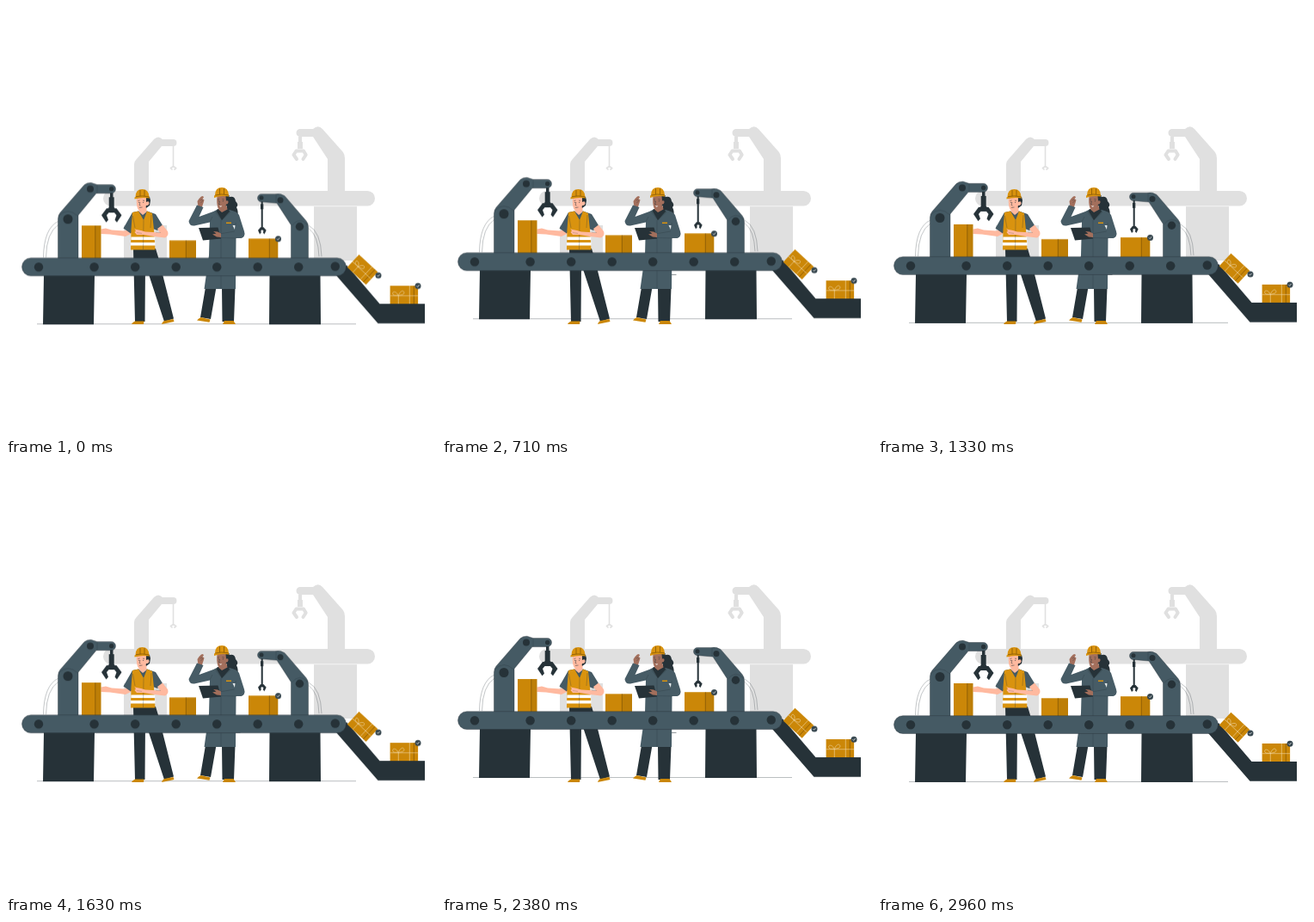
Recreate the animation shown at these times as an HTML page. Size 500x500 px, loop 3000 ms.

```html
<!DOCTYPE html>
<html lang="en">
<head>
<meta charset="utf-8">
<title>Conveyor line</title>
<style>
  html, body { margin: 0; width: 100%; height: 100%; overflow: hidden; background: #fff; }
  svg { display: block; width: 100vw; height: 100vh; }
  .float { animation: float 1.5s linear infinite; }
  @keyframes float {
    0%, 100% { transform: translateY(.3px); }
    50% { transform: translateY(-6.1px); }
  }
  .dark { fill: #263238; }
  .slate { fill: #455a64; }
  .coat { fill: #475c66; }
  .gold { fill: #cb8708; }
  .helmet { fill: #d9930f; }
  .pale { fill: #e0e0e0; }
  .skin { fill: #ffb99f; }
  .brown { fill: #a36f5c; }
  .edge { stroke: #263238; stroke-width: .4; }
  .line { fill: none; stroke: #263238; stroke-width: .5; }
  .seam { fill: none; stroke: #7d5207; stroke-width: .7; }
  .ribbon { fill: none; stroke: #f2d9a8; stroke-width: .6; }
  .round { fill: none; stroke-linecap: round; stroke-linejoin: round; }
</style>
</head>
<body>
<svg viewBox="0 0 500 500">
  <defs>
    <g id="check">
      <circle r="3.5" fill="#37474f"/>
      <path d="M-1.5 0L-.4 1.2L1.7-1.2" fill="none" stroke="#fff" stroke-width=".7"/>
    </g>
    <g id="gift">
      <rect class="gold" x="-16.2" y="-10.5" width="32.5" height="21"/>
      <path class="seam" d="M11.5-10.5V10.5"/>
      <path class="ribbon" d="M-16.2 1.2H16.2M6.5-10.5V10.5M-6.5 1.2V10.5M-6.5 1.2C-9-5-14-4-13-1S-8 0-6.5 1.2C-5-4-1-6 0-3S-4 0-6.5 1.2"/>
    </g>
  </defs>

  <!-- Background line -->
  <g class="pale">
    <path d="M137 255H187V296H137ZM358 233H408V296H358Z"/>
    <rect x="113" y="215" width="316" height="17.5" rx="8.7"/>
    <path d="M149 216V184Q149 181 151 179L172 155Q177 150 182 155H194.500A4 4 0 0 1 194.500 163H181L166 181V216Z"/>
    <path d="M374 216V178L357 152H342A4.500 4.500 0 0 1 342 143H357Q363 137.500 368 143L392 170Q394 173 394 177V216Z"/>
    <path d="M193.700 163H195.300V186H193.700ZM340 152H344V158H345V166H339V158H340Z"/>
    <g class="round" stroke="#e0e0e0">
      <path d="M193 190L191.500 188.500L194.500 186.500L197.700 188.500L196 190" stroke-width="1.700"/>
      <path d="M338 178L334.500 173L337.500 168.500H346L348.700 173L345.500 178" stroke-width="4"/>
    </g>
  </g>
  <path d="M358 233H408" fill="none" stroke="#eee" stroke-width=".7"/>

  <path class="line float" d="M36 369.600H407" opacity=".7"/>
  <path class="line" d="M264 312.500H272.500"/>

  <!-- Worker in vest -->
  <g>
    <path class="dark" d="M148 282H174L177 292L195 363.500L184 367L162 300L161.500 367H150Z"/>
    <path class="gold" d="M150 366.500H160.500L160 369.900H146Q147 368 150 366.500ZM184 366L194.500 364L195.500 367L181 369.900Q181.500 367.500 184 366Z"/>
    <path class="skin" d="M145 258L138 261.500L123 260.500L116 258.500L110.500 259.500V265L121 265.500L139 268L147 264Z"/>
    <path class="slate" d="M154 238.500L147 240L136.500 258.500L145 264.500L149 259H171L176 261L182 255L174 242L164 238.500Z"/>
    <path class="skin" d="M155 233H163.500V239.500L159 243L154.500 239Z"/>
    <path class="helmet" d="M154 238.500L147 240L145.500 260L145 283.500H173.500L172 260L170 241L164 238.500L160 249Z"/>
    <path d="M145.400 268.500H173.200V272H145.400ZM145 275H173.500V278.500H145Z" fill="#fff"/>
    <path class="line" d="M160 249L159.500 283M147.500 244L150 258M169 243L168 258" opacity=".55"/>
    <path class="skin" d="M176 259L182 254.500L188 262Q190 267 185 269.500L172 268L160 266L152 266L149.500 263L151 261.500L149.500 259.500L157 261L162 262.500L179 263.500Z"/>
    <path class="line" d="M152 263.500L158 264.500M174 263L180 263.500" opacity=".4"/>
    <path class="dark" d="M160 222H167L168 226L167 232L163 235L161 228Z"/>
    <path class="skin" d="M152 222H163V228Q166.500 226 166.500 229.500Q166 232.500 163 232L161.500 235.500Q158 239.500 153.500 236.500Q151.500 232 151.700 226Z"/>
    <path class="line" d="M153.500 226.500L155.500 226M159 226L161 226.500M156 228L155 231.500L156.500 232M155 234.500L158.500 234"/>
    <circle class="dark" cx="154.700" cy="228.300" r=".5"/>
    <circle class="dark" cx="159.700" cy="228.300" r=".5"/>
    <path class="helmet" d="M150.500 222Q150.500 213 158.500 213Q166 213 166.500 222L167 223.500Q158 222 149.500 224.500V222.500Z"/>
    <path class="seam" d="M151 221.700Q158 220 166.500 221.800M156 221V214M161 221V214"/>
  </g>

  <!-- Worker in coat -->
  <g>
    <path class="dark" d="M232 327H244.500L238 364L226 362ZM251 327H266.500L265 367H251.500Z"/>
    <path class="gold" d="M226.500 362L237.500 364.500L236.500 367.800L222 365.500Q223.500 363.500 226.500 362ZM254 366H264.500L267 369.900H252Z"/>
    <path class="dark" d="M257 223Q266 219 267 227Q271 231 268 234Q271 240 268.500 245L261 246Q255 240 257 233Z"/>
    <path class="brown" d="M223.500 234L222.500 227L224.500 224L227 221.500L229 221L230 222.500L228.500 224L230.500 225.500L229.500 229L227.500 235Z"/>
    <path class="line" d="M225.500 226Q228 224 228.500 226.500L226.500 229" opacity=".6"/>
    <path class="coat" d="M246 236.500L241 239L224.500 245L229.500 234L222 231.500L212.500 250Q213 256 219 255.500L237 251.500L236 290L230.500 329H267L267.500 270H273Q279 268 277 262L271 243Q269 239 260 237Z"/>
    <path class="line" d="M250 249V329M237 251L240 245M267.500 270L267 252" opacity=".55"/>
    <path class="dark" d="M246 236H258.500L260 239L251 249L245 239Z"/>
    <path class="brown" d="M247.500 230H256L257.500 236.500L251 240L247 236.500Z"/>
    <path class="line" d="M246 236.500L244 240L251 249L260.500 240L258.500 236.500" opacity=".6"/>
    <path class="helmet" d="M256 251.500H262V253H256Z"/>
    <path d="M263.500 255H266.500L266 260Z" fill="#e6eaec"/>
    <path class="coat" d="M268 253L277 264Q278 269 273 270L249 269.500L248 265L266 262Z"/>
    <path class="line" d="M249 269.500L268 270M250 264.700L266 262" opacity=".5"/>
    <path class="dark" d="M224 258L246.500 257.500L250 270.500L229 272.500Z"/>
    <path class="brown" d="M250 264.500L246 262.500L241 262L244.500 264.500L240 265.500L245 268.500L250 269Z"/>
    <path class="dark" d="M252 220H259.500L260 228L256 233Z"/>
    <path class="brown" d="M245.500 221H255.500L256 226.500Q259 225.500 258.500 228.500Q258 231 256 230.500L254 235Q250 238 246.500 235Q244.500 229 245.500 221Z"/>
    <path class="line" d="M246 225L248 224.500M251.500 224.500L253.500 225M248.500 227L247.500 230.500L249 231"/>
    <path d="M247.800 232.600H251.300L249.800 233.700Z" fill="#fff"/>
    <circle class="dark" cx="247.300" cy="226.700" r=".5"/>
    <circle class="dark" cx="252.300" cy="226.700" r=".5"/>
    <path class="helmet" d="M243 220Q243 211 251 211Q258.500 211 259 220V221.500Q250 220 242 223V220.500Z"/>
    <path class="seam" d="M243.500 220Q250 218 258.800 219.800M248.500 219V212M253.500 219V212"/>
  </g>

  <!-- Floating line -->
  <g class="float">
    <path class="line" d="M61 250Q44 258 43.500 292M61 254Q47 263 46.500 292M352 255Q366 262 367 291M352 258.500Q363 266 364 291" opacity=".55"/>
    <path class="dark" d="M44 313H103L102 370H43ZM306.500 313H365.500L366 370H306ZM396 301L434.500 346H487V368.700H432.500L384 313Z"/>

    <g class="slate edge">
      <path d="M60.500 294V247Q60.500 243 63 240L91 207.800Q94 204.800 99 205.200L106 207.500H122.500A5 5 0 0 1 122.500 217.500H105L84 243V294Z"/>
      <path d="M331.500 294V254.500L315 229L297 227.500A4.500 4.500 0 0 1 297 218.500H313Q318 217 324 220.500L349 249.500Q351.500 252.500 351.500 256.500V294Z"/>
    </g>
    <path class="line" d="M106 207.500V217.500M61 244Q72 233 83.500 244M314 218.500V228.500M332 255.500Q341 243.500 351 254.500" opacity=".5"/>
    <g class="dark">
      <circle cx="72" cy="247.500" r="5.500"/>
      <circle cx="98" cy="212.500" r="4"/>
      <circle cx="122.700" cy="212.500" r="2.700"/>
      <circle cx="341.500" cy="256.300" r="4.700"/>
      <circle cx="319" cy="225.500" r="3.500"/>
      <circle cx="297" cy="222.800" r="2.500"/>
      <path d="M121 217H124.500V222H125.700V234L128 236H117.500L119.700 234V222H121ZM296.700 227H298.700V230H299.300V236H298.700V258H296.700V236H296V230H296.700Z"/>
      <path d="M117 235H128.500L134.500 243L129 251.300L126.500 248.500L128.500 243L126 240H119.500L117 243L119 248.500L116.500 251.300L111 243Z"/>
      <path d="M296 257H299.500L302.700 260.500L300.500 265L298.800 263.300L299.500 261L297.700 260L296.300 261L296.800 263.300L295 265L293 260.500Z"/>
    </g>

    <g class="gold">
      <rect x="88" y="255" width="22.500" height="38"/>
      <rect x="190" y="272.300" width="31" height="20.700"/>
      <rect x="282" y="270.200" width="34.300" height="22.800"/>
    </g>
    <path d="M103.800 255H110.500V293H103.800ZM209.300 272.300H221V293H209.300ZM306.300 270.200H316.300V293H306.300Z" opacity=".07"/>
    <path class="seam" d="M103.800 255V293M209.300 272.300V293M306.300 270.200V293"/>
    <use href="#gift" transform="translate(414.500 306.200) rotate(43) scale(.92 .96)"/>
    <use href="#gift" transform="translate(462.800 335.500)"/>
    <use href="#check" x="316.500" y="270.500"/>
    <use href="#check" x="433" y="313"/>
    <use href="#check" x="479" y="325.200"/>

    <rect class="slate edge" x="18.500" y="292.700" width="377" height="20.800" rx="10.400"/>
    <g class="dark">
      <circle cx="38" cy="303.300" r="5.200"/>
      <circle cx="102.600" cy="303.300" r="5.200"/>
      <circle cx="150.200" cy="303.300" r="5.200"/>
      <circle cx="197.700" cy="303.300" r="5.200"/>
      <circle cx="245.200" cy="303.300" r="5.200"/>
      <circle cx="292.700" cy="303.300" r="5.200"/>
      <circle cx="340.200" cy="303.300" r="5.200"/>
      <circle cx="382.800" cy="302.500" r="5.200"/>
    </g>
  </g>
</svg>
</body>
</html>
```
